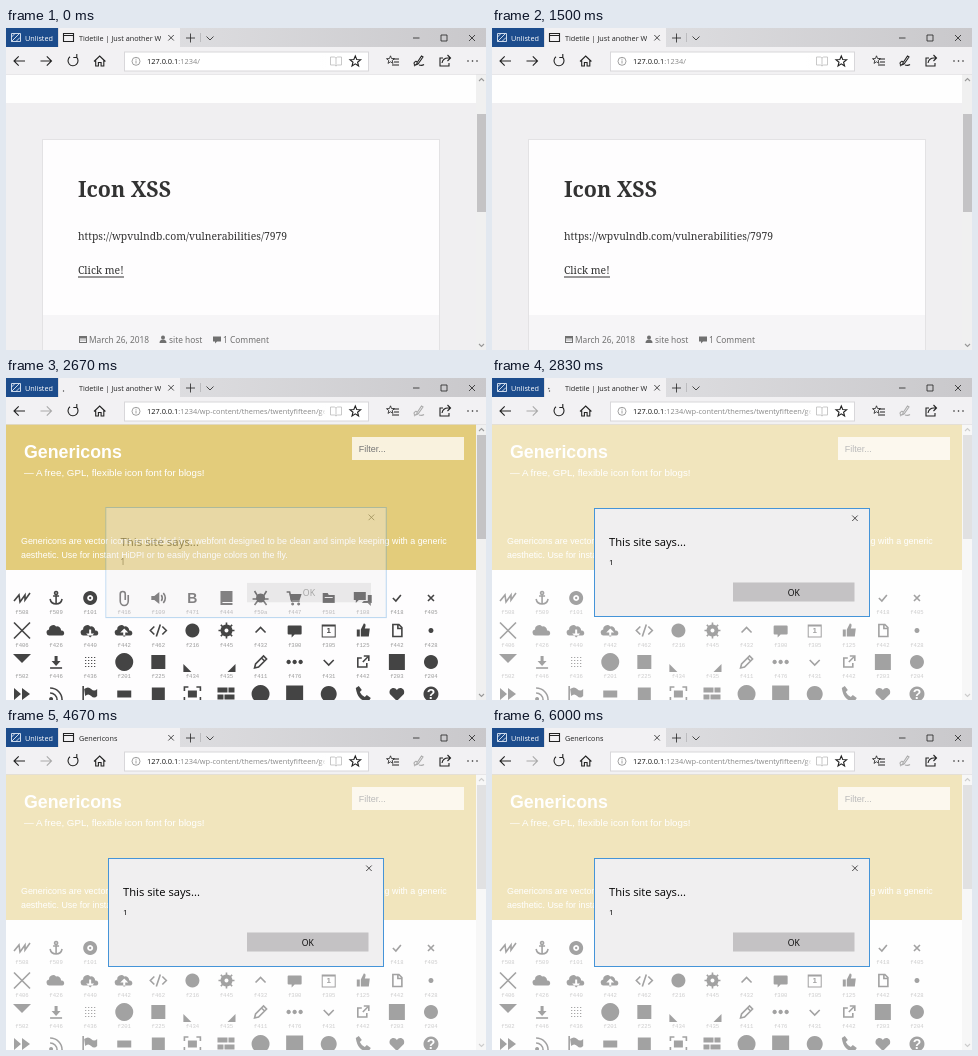
These frames come from a looping animation (480x322 px, 6.34 s). An HTML page:

```html
<!DOCTYPE html>
<html lang="en">
<head>
<meta charset="utf-8">
<title>Browser alert demo</title>
<style>
html, body { margin: 0; width: 100%; height: 100%; overflow: hidden; background: #fff; }
svg { display: block; }
text { white-space: pre; }
.ui { font-family: "Open Sans", "Noto Sans", sans-serif; }
.serif { font-family: "Noto Serif", serif; }
.meta { font-family: "Noto Sans", sans-serif; }
.arial { font-family: "Liberation Sans", Arial, sans-serif; }
.mono { font-family: "Liberation Mono", monospace; }
.line { fill: none; stroke: #222; stroke-width: 1.1; }
.thin { stroke-width: .8; }

/* Every switch is a hard cut on one shared 6340 ms clock. */
.t { animation: 6340ms step-end infinite; }
.untilPress { animation-name: untilPress; }
.fromPress  { animation-name: fromPress; }
.untilLoad  { animation-name: untilLoad; }
.fromLoad   { animation-name: fromLoad; }
.loading    { animation-name: loading; }
.notLoading { animation-name: notLoading; }
.untilPage  { animation-name: untilPage; }
.fromPage   { animation-name: fromPage; }
.fromAlert  { animation-name: fromAlert; }
.untilTitle { animation-name: untilTitle; }
.fromTitle  { animation-name: fromTitle; }
.spin       { animation-name: spin; }
.noSpin     { animation-name: noSpin; }
.forward    { animation-name: forward; }
.pen        { animation-name: pen; }
.share      { animation-name: share; }
.ghost      { animation-name: ghost; }
.alert      { animation-name: alert; }
@keyframes untilPress { 0% { opacity: 1 } 28.86%, 100% { opacity: 0 } }
@keyframes fromPress  { 0% { opacity: 0 } 28.86%, 100% { opacity: 1 } }
@keyframes untilLoad  { 0% { opacity: 1 } 39.43%, 100% { opacity: 0 } }
@keyframes fromLoad   { 0% { opacity: 0 } 39.43%, 100% { opacity: 1 } }
@keyframes loading    { 0% { opacity: 0 } 39.43% { opacity: 1 } 42.11%, 100% { opacity: 0 } }
@keyframes notLoading { 0% { opacity: 1 } 39.43% { opacity: 0 } 42.11%, 100% { opacity: 1 } }
@keyframes untilPage  { 0% { opacity: 1 } 42.11%, 100% { opacity: 0 } }
@keyframes fromPage   { 0% { opacity: 0 } 42.11%, 100% { opacity: 1 } }
@keyframes fromAlert  { 0% { opacity: 0 } 44.63%, 100% { opacity: 1 } }
@keyframes untilTitle { 0% { opacity: 1 } 49.99%, 100% { opacity: 0 } }
@keyframes fromTitle  { 0% { opacity: 0 } 49.99%, 100% { opacity: 1 } }
@keyframes spin       { 0% { opacity: 0 } 42.11% { opacity: 1 } 49.99%, 100% { opacity: 0 } }
@keyframes noSpin     { 0% { opacity: 1 } 42.11% { opacity: 0 } 49.99%, 100% { opacity: 1 } }
@keyframes forward    { 0% { stroke: #222 } 39.43%, 100% { stroke: #aaa } }
@keyframes pen        { 0% { stroke: #222 } 42.11%, 100% { stroke: #aaa } }
@keyframes share      { 0% { stroke: #222 } 39.43% { stroke: #aaa } 42.11%, 100% { stroke: #222 } }
/* Visibility keeps the alert's text crisp. */
@keyframes ghost { 0% { visibility: hidden } 42.11% { visibility: visible } 44.63%, 100% { visibility: hidden } }
@keyframes alert { 0% { visibility: hidden } 44.63%, 100% { visibility: visible } }
</style>
</head>
<body>
<svg width="480" height="322" viewBox="0 0 480 322">
<defs>
  <clipPath id="tabClip"><rect x="72" y="0" width="83" height="19"/></clipPath>
  <clipPath id="urlClip"><rect x="138" y="24" width="181" height="19"/></clipPath>
  <linearGradient id="fade"><stop stop-color="#fff" stop-opacity="0"/><stop offset="1" stop-color="#fff"/></linearGradient>
  <linearGradient id="strip"><stop offset=".35" stop-color="#dddde0"/><stop offset="1" stop-color="#c9c8cb"/></linearGradient>
  <g id="panel">
    <rect x="102.500" y="130.500" width="275" height="108" fill="#f0eff0" stroke="#4594d8"/>
    <path class="line thin" d="M360.200 137.500l5.500 5.500m0-5.500l-5.500 5.500"/>
    <g class="ui" fill="#000">
      <text x="117" y="168" font-size="11.200">This site says...</text>
      <text x="117" y="187" font-size="8">1</text>
      <rect x="241" y="204.500" width="121.500" height="19" fill="#c4c2c4"/>
      <text x="301.700" y="217.500" font-size="8.600" text-anchor="middle">OK</text>
    </g>
  </g>
</defs>

<!-- blog post -->
<g class="t untilPage">
  <rect y="46" width="480" height="276" fill="#f0eff1"/>
  <rect y="46" width="470" height="29" fill="#fefefe"/>
  <rect x="36.500" y="111.500" width="397" height="220" fill="#fefdfe" stroke="#e3e2e4"/>
  <rect x="37" y="287" width="396" height="35" fill="#f6f5f7"/>
  <g class="serif" fill="#333">
    <text x="72" y="169" font-size="21.400" font-weight="700">Icon XSS</text>
    <text x="72" y="212" font-size="10.380">https://wpvulndb.com/vulnerabilities/7979</text>
    <g class="t untilPress">
      <text x="72" y="246" font-size="10.380">Click me!</text>
      <rect x="72" y="248.500" width="46" height="1"/>
    </g>
    <text class="t fromPress" x="72" y="246" font-size="10.380" fill="#777">Click me!</text>
  </g>
  <g class="meta" fill="#707070" font-size="8.400">
    <path fill-rule="evenodd" d="M73 308h8v7h-8ZM74 310.500v3.500h6v-3.500Z"/>
    <path d="M74 312h6" stroke="#707070" stroke-width=".6"/>
    <text x="83" y="314.500">March 26, 2018</text>
    <circle cx="157" cy="309.500" r="2"/><path d="M153.500 315q0-3.500 3.500-3.500t3.500 3.500Z"/>
    <text x="163" y="314.500">site host</text>
    <path d="M207 308.500h8v5h-4l-2 2v-2h-2Z"/>
    <text x="217" y="314.500">1 Comment</text>
  </g>
  <rect x="470" y="46" width="10" height="276" fill="#f0f0f0"/>
  <rect x="471" y="86" width="9" height="98" fill="#c4c3c5"/>
</g>

<!-- icon font page -->
<g class="t fromPage">
  <rect y="46" width="480" height="276" fill="#fefdfe"/>
  <rect y="46" width="470" height="146" fill="#e3cc7b"/>
  <g class="arial" fill="#fff">
    <text x="18" y="80" font-size="17.800" font-weight="700">Genericons</text>
    <text x="18" y="98" font-size="9.750">— A free, GPL, flexible icon font for blogs!</text>
    <text x="15" y="166" font-size="8.900">Genericons are vector icons embedded in a webfont designed to be clean and simple keeping with a generic</text>
    <text x="15" y="180" font-size="8.900">aesthetic. Use for instant HiDPI or to easily change colors on the fly.</text>
    <rect x="346" y="59" width="112" height="23" fill="#f9f2de"/>
    <text x="352.700" y="74" font-size="9" fill="#777">Filter...</text>
  </g>
  <g id="icons" fill="#444" fill-rule="evenodd"></g>
  <rect x="470" y="46" width="10" height="276" fill="#f0f0f0"/>
  <rect x="471" y="57" width="9" height="104" fill="#c4c3c5"/>
</g>
<path class="line" d="M473 53l2.500-2.500 2.500 2.500M473 316l2.500 2.500 2.500-2.500" style="stroke:#999"/>
<rect class="t fromAlert" y="46" width="480" height="276" fill="#fff" fill-opacity=".5"/>

<!-- alert: a faint, slightly larger panel, then the settled one -->
<g class="t ghost" opacity=".36" transform="translate(240 184.500) scale(1.02) translate(-240 -184.500)"><use href="#panel"/></g>
<g class="t alert"><use href="#panel"/></g>

<!-- tab strip -->
<rect width="480" height="19" fill="url(#strip)"/>
<rect y="19" width="480" height="27" fill="#f2f1f3"/>
<rect y="46" width="480" height=".7" fill="#dedde0"/>
<rect width="52" height="19" fill="#1c4c8c"/>
<rect x="53" width="121" height="20" fill="#f2f1f3"/>
<path d="M5.500 5.500h9v8h-9ZM5.500 9l3.500-3.500M5.500 13.500l8-8M10 13.500l4-4" fill="none" stroke="#dfe8f5" stroke-width=".9"/>
<g class="ui" font-size="7.250" fill="#222">
  <text x="19" y="12.500" fill="#fff">Unlisted</text>
  <g clip-path="url(#tabClip)">
    <text class="t untilTitle" x="73" y="12.500">Tidetile | Just another W</text>
    <text class="t fromTitle" x="73" y="12.500">Genericons</text>
  </g>
</g>
<path class="line t noSpin" d="M57.500 5.500h10v8h-10ZM57.500 7.500h10"/>
<g class="t spin" fill="#444">
  <circle cx="57.500" cy="13" r=".7"/>
  <g class="t fromAlert"><circle cx="56.800" cy="10.500" r=".7"/></g>
</g>
<path class="line thin" d="M162.300 7l5.500 5.500m0-5.500l-5.500 5.500M180 10h9M184.500 5.500v9M200.500 8.500l3.500 3.500 3.500-3.500"/>
<path class="line thin" d="M194.500 5v9" style="stroke:#b4b4b8"/>
<path class="line thin" d="M407 10h6.500M435 7h6v6h-6ZM463 7l6 6m0-6l-6 6"/>

<!-- toolbar -->
<path class="line" d="M19 33H8m4.700-4.700L8 33l4.700 4.700"/>
<path class="line t forward" d="M34.500 33h11m-4.700-4.700l4.700 4.700-4.700 4.700"/>
<path class="line t notLoading" d="M70.500 29.200a5 5 0 1 1-6.500-.4M70.800 26v3.500h-3.500"/>
<path class="line t loading" d="M63 29l8 8m0-8l-8 8"/>
<path class="line" d="M88 33.500l5.700-5.500 5.700 5.500M89.700 32.500V38h2.700v-3.500h2.700V38h2.700v-5.500"/>
<rect x="118.500" y="24" width="244" height="19" fill="#fff" stroke="#d8d7da"/>
<g fill="none" stroke="#888" stroke-width=".8"><circle cx="130" cy="33.300" r="4"/><path d="M130 32.500v3M130 30.700v1"/></g>
<g class="ui" font-size="7.400" clip-path="url(#urlClip)" fill="#888">
  <text class="t untilLoad" x="141" y="36"><tspan fill="#111">127.0.0.1</tspan>:1234/</text>
  <text class="t fromLoad" x="141" y="36"><tspan fill="#111">127.0.0.1</tspan>:1234/wp-content/themes/twentyfifteen/genericons</text>
</g>
<rect x="313" y="26" width="7" height="15" fill="url(#fade)"/>
<path class="line thin" d="M324.500 29h4l1.500 1 1.500-1h4v8h-4l-1.500 1-1.500-1h-4ZM330 30v8" style="stroke:#bbb"/>
<path class="line" id="star"/>
<g transform="translate(384.500 32) scale(.75)"><path class="line" id="listStar"/></g>
<path class="line" d="M387 31h6M388 34h5M386 37h7"/>
<path class="line t pen" d="M408 38q4-2 3-4t-3 1q0 3 4 1l5-7-1.500-1-4 6M413 37q3 1 5-.5"/>
<path class="line t share" d="M437 30h-3v8h9v-3M436 35q1-5 6-5h2.500m-3-3l3 3-3 3"/>
<g fill="#222"><circle cx="462" cy="33" r=".8"/><circle cx="466.500" cy="33" r=".8"/><circle cx="471" cy="33" r=".8"/></g>
</svg>

<script>
const $ = id => document.getElementById(id);

function starPath(x, y, r) {
  const points = Array.from({ length: 10 }, (_, i) => {
    const a = i * Math.PI / 5, k = i % 2 ? r * .43 : r;
    return (x + k * Math.sin(a)).toFixed(2) + " " + (y - k * Math.cos(a)).toFixed(2);
  });
  return "M" + points.join("L") + "Z";
}
$("star").setAttribute("d", starPath(349.3, 33.5, 5.6));
$("listStar").setAttribute("d", starPath(0, 0, 5.6));

const disc = (r, x = 0, y = 0) => `M${x} ${y - r}a${r} ${r} 0 1 0 .01 0Z`;
const box = (w, h = w, x = 0, y = 0) => `M${x - w / 2} ${y - h / 2}h${w}v${h}h${-w}Z`;
const cloud = "M-6 5a3 3 0 0 1-1-6 4 4 0 0 1 7-3 4 4 0 0 1 5 4 2.500 2.500 0 0 1 1 5Z";
const dots = Array.from({ length: 16 }, (_, i) => box(1.2, 1.2, i % 4 * 3 - 4.5, (i >> 2) * 3 - 4.5)).join("");
const gear = disc(6) + disc(2);
const teeth = Array.from({ length: 8 }, (_, i) => {
  const x = Math.cos(i * Math.PI / 4), y = Math.sin(i * Math.PI / 4);
  return `M${x * 5} ${y * 5}L${x * 8} ${y * 8}`;
}).join("");

// Each icon is [filled path, stroked path, letter, letter colour].
const rows = [
  [
    ["", "M-8 3-3-3-2 4 3-3 3 2 8-5"],
    ["", "M0-4V6M-6 1Q-5 6 0 6T6 1M-3-2H3" + disc(1.5, 0, -5)],
    [disc(7) + disc(3) + disc(1.2)],
    ["", "M4-3V3A3.500 4 0 0 1-4 3V-4A2.300 2.300 0 0 1 1-4V2"],
    ["M-7-2h3l5-4v12l-5-4h-3Z", "M3-3q2 3 0 6M5-5q4 5 0 10"],
    ["", "", "B"],
    ["M-6-7H6V4H-4v1H6v2H-6Z"],
    [disc(4.5), "M-6-7-3-2H3L6-7M-8 1H8M-6 7-3 3H3L6 7"],
    ["M-5-4H7L5 2H-4Z" + disc(1.5, -2, 6) + disc(1.5, 4, 6), "M-8-6h3l2 9h8"],
    ["M-6-5h5l1 2h6v8h-12ZM-4-1h8v1h-8Z"],
    ["M-9-6H3V2H-4l-3 3V2h-2ZM5-3h4v8h-1v3l-3-3h-6l2-2h4Z"],
    ["", "M-4 0l3 3 5-6"],
    ["", "M-3-3 3 3M3-3-3 3"]
  ],
  [
    ["", "M-8-8 8 8M8-8-8 8"],
    [cloud],
    [cloud + "M-1-1h2v4h3l-4 4-4-4h3Z"],
    [cloud + "M-1 6h2v-4h3l-4-4-4 4h3Z"],
    ["", "M-4-4-8 0-4 4M4-4 8 0 4 4M2-6-2 6"],
    [disc(7)],
    [gear, teeth],
    ["", "M-5 2 0-3 5 2"],
    ["M-6-5H6q1 0 1 1V3q0 1-1 1H0l-3 3V4h-3q-1 0-1-1V-4q0-1 1-1Z"],
    ["M-7-6H7V7H-7ZM-6-4V6H6V-4Z", "", "1"],
    ["M-6-1h3v7h-3ZM-2-1 1-7q3 0 1 5h5l-1 8h-8Z"],
    ["", "M-4-6H2l3 3V6H-4ZM1-6v4h4"],
    [disc(2.5)]
  ],
  [
    ["M-9-8H9L0 1Z"],
    ["M-1.500-6h3v5h3L0 4-4.500-1h3Z", "M-6 6H6"],
    [dots],
    [disc(9)],
    [box(14)],
    ["M-9 2v8h8Z"],
    ["M9 2v8H1Z"],
    ["", "M-6 6l1-4 8-8 3 3-8 8ZM1-4l3 3"],
    [disc(2.2, -6) + disc(2.2) + disc(2.2, 6)],
    ["", "M-5-2 0 3 5-2"],
    ["", "M-1-4H-5V5H4V1M0 0 5-5M1-6H6V-1"],
    [box(16)],
    [disc(7)]
  ],
  [
    ["M-8-6-1 0-8 6ZM0-6 8 0 0 6Z"],
    [disc(2, -5, 5), "M-6-1a7 7 0 0 1 7 7M-6-6A12 12 0 0 1 6 6"],
    ["M-6-5q4-3 7 0t6 0v7q-3 3-6 0t-6 0Z", "M-7-8V8"],
    [box(14, 7)],
    [box(13)],
    [box(9, 7), "M-8-3V-7H-4M4-7H8V-3M8 3V7H4M-4 7H-8V3"],
    [box(10, 5, -4, -4) + box(6, 5, 5, -4) + box(6, 5, -6, 3) + box(10, 5, 3, 3)],
    [disc(9)],
    [box(17)],
    [disc(8)],
    ["M-7-6l3-2 3 4-2 2q2 4 5 5l2-2 4 3-2 3Q-5 8-7-6Z"],
    ["M0 7-7 0C-9-6-2-8 0-4 2-8 9-6 7 0Z"],
    [disc(7.5), "", "?", "#fff"]
  ]
];
const labels = [
  "f508 f509 f101 f416 f109 f471 f444 f50a f447 f501 f108 f418 f405",
  "f406 f426 f440 f442 f462 f216 f445 f432 f300 f305 f125 f442 f428",
  "f502 f446 f436 f201 f225 f434 f435 f411 f476 f431 f442 f203 f204"
].map(row => row.split(" "));
const centers = [220, 252.5, 284, 316];

$("icons").innerHTML = rows.map((row, r) => row.map(([fill, stroke, letter, ink], c) => {
  const x = 16 + c * 34.08;
  let out = `<g transform="translate(${x} ${centers[r]})">`;
  if (fill) out += `<path d="${fill}"/>`;
  if (stroke) out += `<path d="${stroke}" fill="none" stroke="#444" stroke-width="1.6"/>`;
  if (letter) {
    const size = letter === "1" ? 8 : 14;
    out += `<text class="arial" y="${size * .36}" font-size="${size}" font-weight="700" text-anchor="middle" fill="${ink || "#444"}">${letter}</text>`;
  }
  if (labels[r]) {
    out += `<text class="mono" y="16" font-size="5.6" fill="#999" text-anchor="middle">${labels[r][c]}</text>`;
  }
  return out + "</g>";
}).join("")).join("");
</script>
</body>
</html>
```
